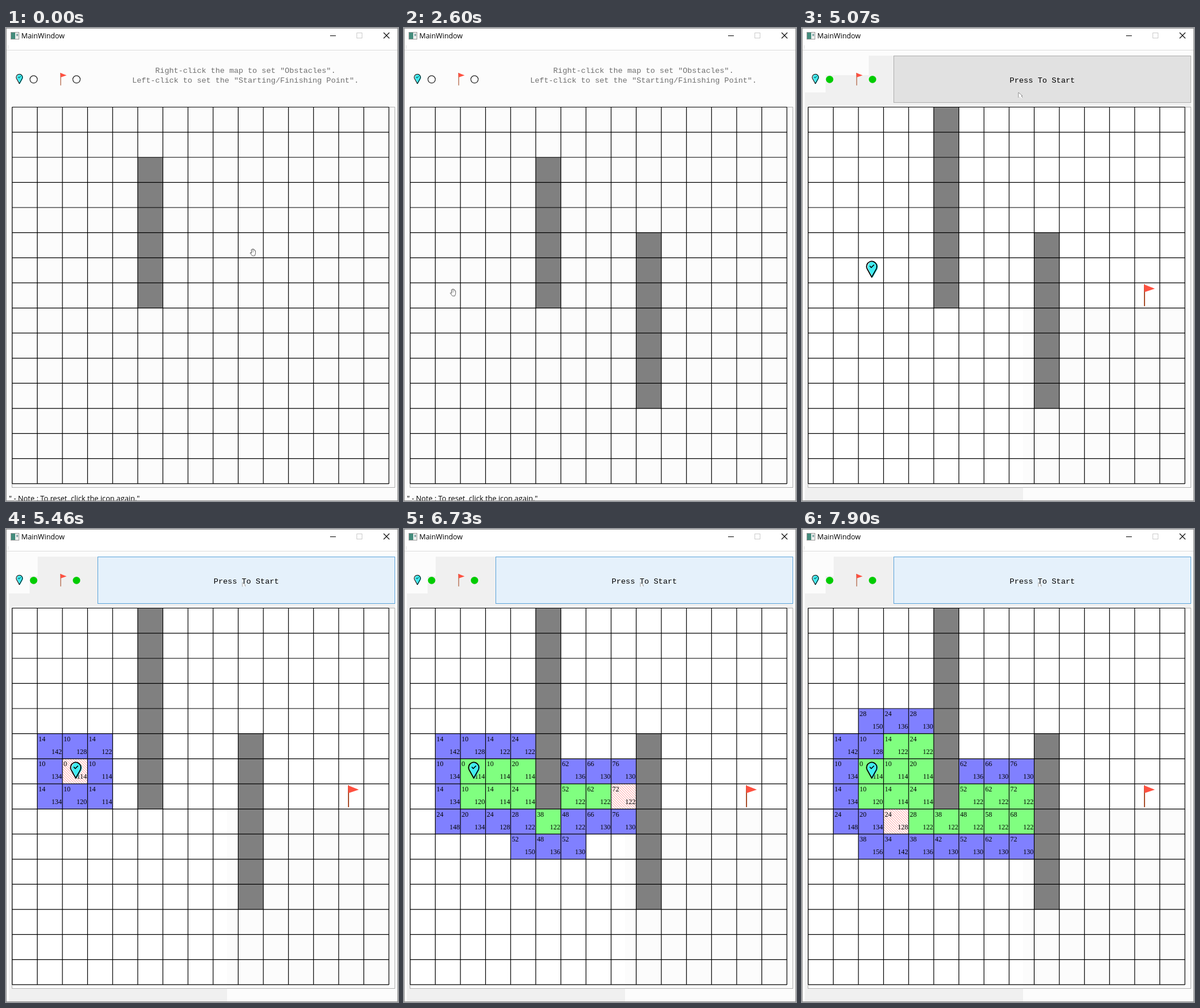
Write an HTML page with a canvas that moves like this. It is 681x822 px and loops after 8 s.

```html
<!DOCTYPE html>
<html>
<head>
<meta charset="utf-8">
<style>
  html, body { margin: 0; width: 100%; height: 100%; overflow: hidden; background: #fcfcfc; }
  canvas { display: block; }
</style>
</head>
<body>
<canvas id="stage" width="681" height="822"></canvas>
<script>
const g = document.getElementById('stage').getContext('2d');
const LOOP = 8000, LAST = 7900, N = 15, CELL = 43.63, X0 = 10.75, Y0 = 137.5;
const START = [2, 6], GOAL = [13, 7];
const START_SET = 2800, GOAL_SET = 4230, NOTE_GONE = 5060;
const SEARCH = 5356, STEP = 151, SPREAD = 90;
const SANS = '"Open Sans", "Noto Sans", sans-serif';
const MONO = '"Liberation Mono", monospace';
const SERIF = '"Liberation Serif", serif';

const px = c => X0 + c * CELL;
const py = r => Y0 + r * CELL;

// Time at which each obstacle is set: [column, row, ms]
const walls = [2, 3, 4, 5, 6, 7].map(r => [5, r, 0]).concat(
  [250, 500, 750, 980, 1220, 1550, 1800].map((t, i) => [9, 5 + i, t]),
  [[5, 1, 4600], [5, 0, 4790]]);
const isWall = (c, r) => walls.some(w => w[0] === c && w[1] === r);

// Mouse path: [ms, x, y]
const mouse = [
  [0, 429, 390], [120, 429, 390], [250, 428, 380], [500, 430, 420], [750, 433, 465],
  [980, 440, 510], [1100, 439, 530], [1340, 433, 563], [1480, 433, 563], [1600, 432, 605],
  [1800, 430, 640], [1950, 400, 648], [2180, 202, 567], [2330, 150, 540], [2450, 88, 512],
  [2600, 85, 460], [2750, 121, 425], [2880, 121, 425], [3290, 548, 440], [3600, 602, 478],
  [4250, 602, 478], [4600, 250, 205], [4800, 250, 160], [5070, 379, 117], [5200, 379, 117],
  [5350, 413, 97], [LOOP, 413, 97]];

function mouseAt(t) {
  const i = mouse.findIndex(k => k[0] > t);
  const [a, x, y] = mouse[i - 1], [b, u, v] = mouse[i];
  const k = (t - a) / (b - a);
  return [x + (u - x) * k, y + (v - y) * k];
}

function rect(x, y, w, h, fill, stroke) {
  if (fill) { g.fillStyle = fill; g.fillRect(x, y, w, h); }
  if (stroke) { g.strokeStyle = stroke; g.lineWidth = 1; g.strokeRect(x + .5, y + .5, w - 1, h - 1); }
}

function text(s, x, y, font, color = '#000', align = 'left') {
  g.font = font;
  g.fillStyle = color;
  g.textAlign = align;
  g.fillText(s, x, y);
}

function line(color, width, ...p) {
  g.strokeStyle = color;
  g.lineWidth = width;
  g.beginPath();
  for (let i = 0; i < p.length; i += 2) g.lineTo(p[i], p[i + 1]);
  g.stroke();
}

function poly(fill, ...p) {
  g.fillStyle = fill;
  g.beginPath();
  for (let i = 0; i < p.length; i += 2) g.lineTo(p[i], p[i + 1]);
  g.closePath();
  g.fill();
}

function at(x, y, s, draw) {
  g.save();
  g.translate(x, y);
  g.scale(s, s);
  draw();
  g.restore();
}

const drop = () => {
  g.beginPath();
  g.arc(0, 0, 9, Math.PI * .87, Math.PI * .13);
  g.lineTo(0, 18.5);
  g.closePath();
};

const pin = (x, y, s) => at(x, y, s, () => {
  g.fillStyle = '#40ecf2';
  at(1.8, .6, 1, () => { drop(); g.fill(); });
  drop();
  g.strokeStyle = '#000';
  g.lineWidth = 1.8;
  g.lineJoin = 'round';
  g.stroke();
  line('#000', 1.6, -3.5, -1, -1, 1.8, 4, -3);
});

const flag = (x, y, s) => at(x, y, s, () => {
  line('#a8502c', 2, 0, 0, 0, 38);
  poly('#ff5040', -1, 0, 18, 7.5, 0, 13.5);
});

function radio(x, on) {
  g.beginPath();
  g.arc(x, 89.3, 6.4, 0, 7);
  g.fillStyle = on ? '#00cc00' : '#fff';
  g.fill();
  if (!on) { g.strokeStyle = '#222'; g.lineWidth = 1.2; g.stroke(); }
}

const hand = (x, y) => at(x, y, 1, () => {
  g.fillStyle = '#fff';
  g.strokeStyle = '#555';
  g.lineWidth = .9;
  g.beginPath();
  g.moveTo(-1, 6);
  g.lineTo(-5, 1);
  g.lineTo(-4, 0);
  g.lineTo(-2.5, 1.5);
  g.lineTo(-2.8, -4);
  for (const fx of [-1.9, 0, 1.9]) g.arc(fx, fx ? -4.4 : -5.4, .9, Math.PI, 0);
  g.lineTo(3, -3);
  g.lineTo(4.4, -3);
  g.lineTo(4.4, 2);
  g.lineTo(3, 6);
  g.closePath();
  g.fill();
  g.stroke();
  line('#777', .6, -.95, -4, -.95, 0);
  line('#777', .6, .95, -4, .95, 0);
});

const arrow = (x, y, s) => at(x, y, s, () => {
  poly('#fff', -3, -5, -3, 4, 0, 2, 2, 5, 4, 4, 2, 1, 4, 1);
  line('#777', .8, -3, 4, -3, -5, 4, 1, 2, 1, 4, 4);
});

// Repainted widgets: grey window and white map view inside the box
function repaint(x, y, r, b) {
  rect(x, y, r - x, b - y, '#f0f0f0');
  const l = Math.max(x, 10), t = Math.max(y, 137);
  rect(l, t, Math.min(r, 676) - l, Math.min(b, 798) - t, '#fff');
}

function distance(c, r) {
  const dx = Math.abs(c - GOAL[0]), dy = Math.abs(r - GOAL[1]);
  return 10 * Math.max(dx, dy) + 4 * Math.min(dx, dy);
}

// A* up to time t; ties go to the node nearest the goal
function search(t) {
  const nodes = new Map();
  const visit = (c, r, cost) => {
    const key = r * N + c, old = nodes.get(key);
    if (old && old.cost <= cost) return;
    const h = distance(c, r);
    nodes.set(key, { c, r, cost, h, f: cost + h, closed: false });
  };
  let current = null;
  visit(...START, 0);
  for (let when = SEARCH; when <= t; when += STEP) {
    current = [...nodes.values()].filter(n => !n.closed).sort((a, b) => a.f - b.f || a.h - b.h)[0];
    current.closed = true;
    if (t < when + SPREAD) break;
    for (let dr = -1; dr <= 1; dr++) for (let dc = -1; dc <= 1; dc++) {
      const c = current.c + dc, r = current.r + dr;
      if ((!dc && !dr) || c < 0 || r < 0 || c >= N || r >= N || isWall(c, r)) continue;
      visit(c, r, current.cost + (dc && dr ? 14 : 10));
    }
  }
  return { nodes, current };
}

const fillCell = (c, r, color) => rect(px(c), py(r), CELL, CELL, color);

function hatch(c, r) {
  const x = px(c), y = py(r);
  fillCell(c, r, '#fff');
  g.save();
  g.beginPath();
  g.rect(x, y, CELL, CELL);
  g.clip();
  for (let d = -44; d < 44; d += 4.4) line('#ff7070', .8, x + d, y, x + d + 44, y + 44);
  g.restore();
}

function drawMap(t) {
  for (const [c, r, when] of walls) if (t >= when) fillCell(c, r, '#808080');
  const found = t >= SEARCH ? search(t) : null;
  if (found) for (const n of found.nodes.values()) {
    if (n === found.current) hatch(n.c, n.r);
    else fillCell(n.c, n.r, n.closed ? '#80ff80' : '#8080ff');
  }
  for (let i = 0; i <= N; i++) {
    line('#000', 1.2, px(i), py(0), px(i), py(N));
    line('#000', 1.2, px(0), py(i), px(N), py(i));
  }
  if (found) for (const n of found.nodes.values()) {
    const x = px(n.c), y = py(n.r);
    text(n.cost, x + 2, y + 13, '12px ' + SERIF);
    text(n.f, x + 42.5, y + 35, '12px ' + SERIF, '#000', 'right');
  }
  if (t >= START_SET) pin(121.2, 414.5, 1);
  if (t >= GOAL_SET) flag(595, 445.5, 1);
}

function drawTitle() {
  rect(0, 0, 681, 39, '#fff');
  rect(0, 38, 681, 1, '#dcdcdc');
  rect(3, 30, 1, 6, '#ddd');
  rect(8, 7, 15, 13, '#eee', '#999');
  rect(9, 8, 7, 11, '#438c7c');
  rect(18, 10, 3, 4, '#8aa');
  text('MainWindow', 26.5, 18, '12.4px ' + SANS);
  rect(563, 13, 10, 1, '#000');
  rect(609, 8, 10, 10, null, '#ccc');
  line('#000', 1.1, 656, 8, 666, 18);
  line('#000', 1.1, 666, 8, 656, 18);
}

function drawButton(hover) {
  rect(159, 48, 517, 82, hover ? '#e5f1fb' : '#e1e1e1', hover ? '#5aa3da' : '#adadad');
  text('Press To Start', 417.5, 94.5, '13.5px ' + MONO, '#000', 'center');
}

function draw(t) {
  rect(0, 0, 681, 822, '#fcfcfc');
  drawTitle();
  const hint = '13.4px ' + MONO;
  text('Right-click the map to set "Obstacles".', 416, 78, hint, '#707070', 'center');
  text('Left-click to set the "Starting/Finishing Point".', 416, 95, hint, '#707070', 'center');
  text('" - Note : To reset, click the icon again."', 5, 822, '12.7px ' + SANS);

  if (t >= START_SET) repaint(41, 82, 133, 434);
  if (t >= GOAL_SET) repaint(116, 48, 676, 487);
  if (t >= NOTE_GONE) repaint(5, 112, 384, 822);
  if (t >= SEARCH + SPREAD) repaint(55, 48, 676, 487);

  rect(10, 137, 666, 662, null, '#b0b0b0');
  pin(23.2, 85.6, .6);
  radio(48, t >= START_SET);
  flag(95, 78, .57);
  radio(122.5, t >= GOAL_SET);
  if (t >= GOAL_SET) drawButton(t >= SEARCH);
  drawMap(t);

  const [x, y] = mouseAt(t);
  if (y > 137) hand(x, y);
  else arrow(x, y, t < SEARCH ? 1 : .8);
  rect(0, 0, 681, 822, null, '#8a8a8a');
}

function tick(now) {
  draw(Math.min(now % LOOP, LAST));
  requestAnimationFrame(tick);
}
requestAnimationFrame(tick);
</script>
</body>
</html>
```
